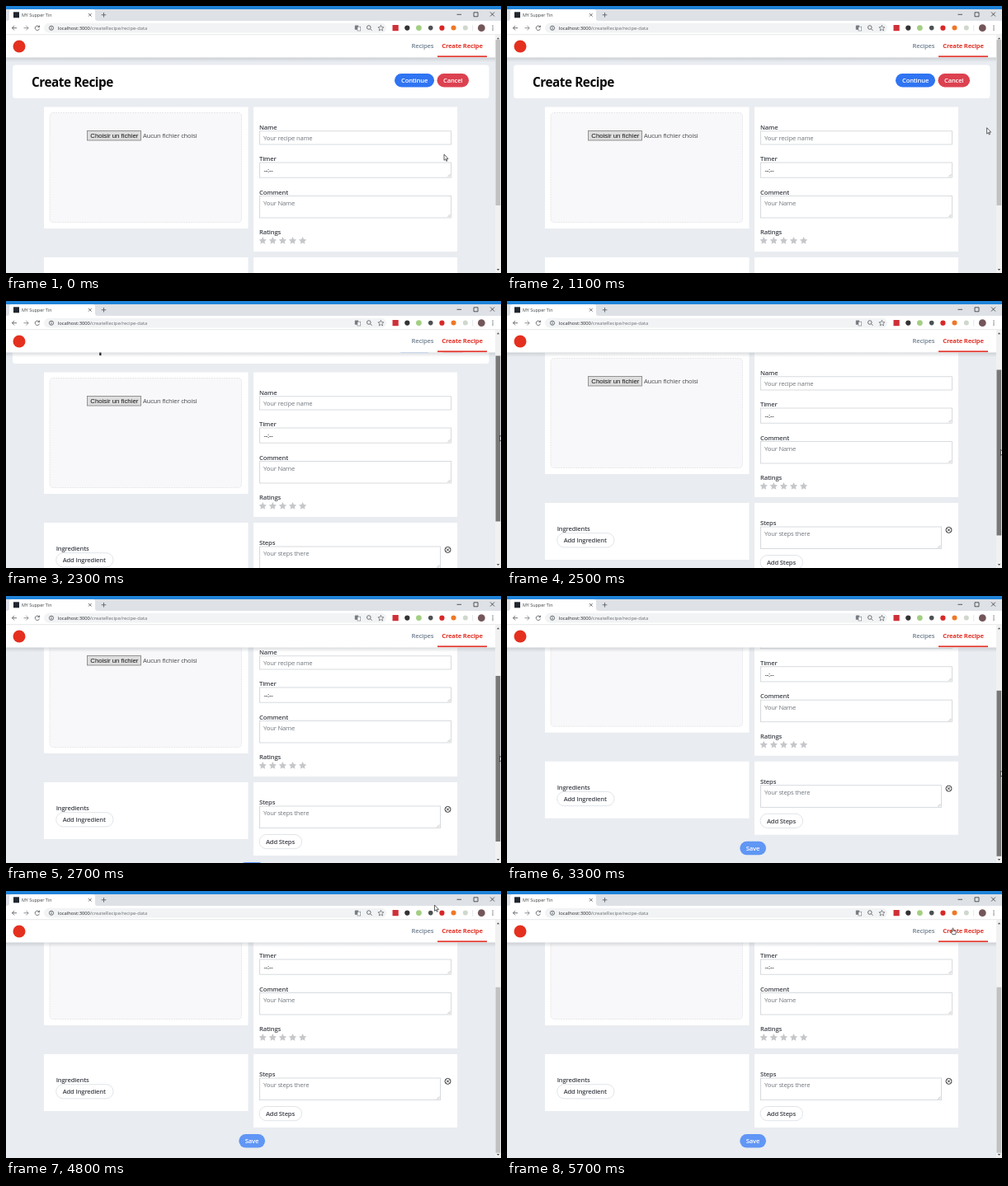
Write an HTML page that moves like this. It is 600x324 px and loops after 5800 ms.

```html
<!DOCTYPE html>
<html lang="en">
<head>
<meta charset="utf-8">
<title>Create Recipe</title>
<style>
html, body { margin: 0; width: 100%; height: 100%; overflow: hidden; background: #fff; }
svg { display: block; width: 100vw; height: 100vh; }
text { font: 7.6px "Open Sans", "Noto Sans", sans-serif; letter-spacing: -.16px; fill: #43474c; white-space: pre; }
.label { font-weight: 600; fill: #3d4148; }
.hint { fill: #70767d; }
.title { font-size: 15.3px; font-weight: 700; fill: #0b0b0d; letter-spacing: -.45px; }
.light { font-weight: 600; fill: #fff; }
.nav { font-weight: 600; fill: #6f7f8f; }
.active { font-weight: 700; fill: #e3342a; letter-spacing: -.2px; }
.native { font: 7.8px "Liberation Sans", Arial, sans-serif; letter-spacing: 0; fill: #111; }
.tab { font-size: 5.4px; letter-spacing: 0; fill: #3c4043; }
.url { font-size: 5.8px; letter-spacing: 0; fill: #6a6e73; }
.line { fill: none; stroke: #5f6368; stroke-width: .9; }
.field { fill: #fff; stroke: #cdd2d8; stroke-width: .8; }
.pill { fill: #fff; stroke: #d9dde2; stroke-width: .8; }
</style>
</head>
<body>
<svg id="stage" viewBox="0 0 600 324" preserveAspectRatio="none">
  <defs>
    <linearGradient id="shade" x2="0" y2="1">
      <stop offset="0" stop-color="#8c939b" stop-opacity=".34"/>
      <stop offset="1" stop-color="#8c939b" stop-opacity="0"/>
    </linearGradient>
  </defs>
  <rect width="600" height="324" fill="#e9ecf0"/>
  <g id="page"></g>
  <g id="nav"></g>
  <g id="chrome"></g>
  <g id="bar">
    <rect x="593" y="35" width="7" height="289" fill="#f1f1f1"/>
    <path d="M594.8 40.2l1.7-2 1.7 2zM594.8 319l1.7 2 1.7-2z" fill="#505050"/>
    <rect id="thumb" x="593.5" y="41" width="5.7" height="201"/>
  </g>
  <g id="pointer" stroke="#222" stroke-width=".7" stroke-linejoin="round" fill="#fff">
    <path id="arrow" d="M0 0V7.3L1.7 5.8 2.8 8.3 3.9 7.8 2.8 5.4H5z"/>
    <path id="hand" d="M-.7 .2Q0-.6 .7 .2V2.8L3 3.3Q3.9 3.6 3.8 4.5L3.2 7.4H-.6L-2.6 4.4Q-2.4 3.4-.7 4.6z"/>
  </g>
</svg>
<script>
const $ = id => document.getElementById(id);
const LOOP = 5800, STEP = 100;

const rect = (x, y, w, h, fill, r = 0) =>
  `<rect x="${x}" y="${y}" width="${w}" height="${h}" rx="${r}" fill="${fill}"/>`;
const shape = (cls, x, y, w, h, r = 0) =>
  `<rect class="${cls}" x="${x}" y="${y}" width="${w}" height="${h}" rx="${r}"/>`;
const text = (x, y, s, cls = '') => `<text x="${x}" y="${y}" class="${cls}">${s}</text>`;
const dot = (x, y, r, fill) => `<circle cx="${x}" cy="${y}" r="${r}" fill="${fill}"/>`;
const line = (d, extra = '') => `<path class="line" d="${d}" ${extra}/>`;
const area = (x, y, w, h) => shape('field', x, y, w, h) +
  line(`M${x + w - 4} ${y + h - 1}l3-3M${x + w - 2.2} ${y + h - 1}l1.2-1.2`, 'style="stroke:#9a9a9a;stroke-width:.6"');

function star(cx, cy, r) {
  const pts = Array.from({ length: 10 }, (_, i) => {
    const a = i * Math.PI / 5 - Math.PI / 2, d = i % 2 ? r * .48 : r;
    return (cx + d * Math.cos(a)).toFixed(2) + ',' + (cy + d * Math.sin(a)).toFixed(2);
  });
  return `<polygon points="${pts.join(' ')}" fill="#c5c7ca"/>`;
}

$('page').innerHTML = [
  rect(8, 71.5, 577.5, 40.5, '#fff', 3.5),
  text(31, 98, 'Create Recipe', 'title'),
  rect(471, 82, 48, 16.5, '#2f74f2', 8.2), text(479, 93, 'Continue', 'light'),
  rect(522.5, 82, 38.5, 16.5, '#dc4150', 8.2), text(530, 93, 'Cancel', 'light'),

  rect(46, 122.5, 247.5, 147.5, '#fff'),
  '<rect x="53" y="129.5" width="232.5" height="133" rx="4" fill="#f8f7f9" stroke="#e3e4e8" stroke-width=".8" stroke-dasharray="2 1"/>',
  '<rect x="98.5" y="151.5" width="65" height="11.5" fill="#dedede" stroke="#8b8b8b" stroke-width=".9"/>',
  text(102.3, 160, 'Choisir un fichier', 'native'),
  text(166, 160, 'Aucun fichier choisi'),

  rect(300, 122.5, 247, 175.5, '#fff'),
  text(307, 150, 'Name', 'label'), shape('field', 307.4, 151.8, 232, 16.2),
  text(312, 163, 'Your recipe name', 'hint'),
  text(307, 188, 'Timer', 'label'), area(307.4, 190, 232, 18.2),
  text(312.5, 202, '--:--', 'label'),
  text(307, 228.6, 'Comment', 'label'), area(307.4, 230.4, 232, 26.6),
  text(312, 242, 'Your Name', 'hint'),
  text(307, 277, 'Ratings', 'label'),
  ...[0, 1, 2, 3, 4].map(i => star(311.2 + i * 12.1, 284.9, 4.9)),

  rect(46, 305, 247.5, 69, '#fff'),
  text(60.7, 339, 'Ingredients', 'label'),
  shape('pill', 60.7, 341.7, 69.3, 17.2, 8.6), text(68.7, 353.4, 'Add Ingredient', 'label'),

  rect(300, 305, 247, 89, '#fff'),
  text(307, 332, 'Steps', 'label'), area(307.4, 334, 219, 26.6),
  text(312, 345.4, 'Your steps there', 'hint'),
  line('M533.9 336.3l3.2 3.2m0-3.2l-3.2 3.2', 'style="stroke:#222"'),
  '<circle class="line" cx="535.5" cy="337.9" r="3.5" style="stroke:#222"/>',
  shape('pill', 307, 368.5, 51.5, 17.2, 8.6), text(315, 380, 'Add Steps', 'label'),
  rect(282.3, 402, 31.7, 16.6, '#6096f5', 8.3), text(289.8, 413.2, 'Save', 'light')
].join('');

$('nav').innerHTML = [
  rect(0, 62, 593, 6, 'url(#shade)'),
  rect(0, 35, 593, 27.5, '#fff'),
  dot(16, 49, 7.5, '#e5301f'),
  text(491.5, 51, 'Recipes', 'nav'), text(528.3, 51, 'Create Recipe', 'active'),
  rect(523, 60.4, 60, 1.7, '#e3342a')
].join('');

$('chrome').innerHTML = [
  rect(0, 0, 600, 18, '#dee1e6'), rect(0, 0, 600, 4, '#1f83d8'),
  '<path d="M1 18Q4 18 4 15V7Q4 4 7 4H105Q108 4 108 7V15Q108 18 111 18z" fill="#fff"/>',
  rect(9, 7.3, 7, 7, '#20262f'),
  text(19, 13, 'MY Supper Tin', 'tab'),
  line('M100 9l3.6 3.6m0-3.6l-3.6 3.6M118.5 8v5.6m-2.8-2.8h5.6'),
  line('M546.5 10.3h5.5M567 7.8h5v5h-5zM587 7.5l5 5m0-5l-5 5', 'style="stroke:#333;stroke-width:.8"'),
  rect(0, 18, 600, 17, '#fff'), rect(0, 34.5, 600, .6, '#d6d8dc'),
  rect(46, 20.8, 415, 11.8, '#f1f3f4', 5.9),
  line('M13 26.7H7.4m2.7-2.7l-2.7 2.7 2.7 2.7'),
  line('M21.5 26.7h5.6m-2.7-2.7l2.7 2.7-2.7 2.7', 'opacity=".75"'),
  line('M40 25a2.7 2.7 0 1 0 .5 2.6M40.6 23.6v2.1h-2.1'),
  '<circle class="line" cx="55" cy="26.7" r="2.6"/>', line('M55 26.2v2M55 24.9v.7'),
  text(62.8, 28.9, '<tspan fill="#25282c">localhost:3000</tspan>/createRecipe/recipe-data', 'url'),
  rect(422.8, 23.5, 4.4, 5.2, '#777c82', .5),
  '<rect x="426" y="25.2" width="3.7" height="4.8" fill="#fff" stroke="#777c82" stroke-width=".6"/>',
  '<circle class="line" cx="439.8" cy="26" r="2.3"/>', line('M441.5 27.7l2 2'),
  '<path class="line" d="M454.4 23.3l1 2.3 2.5.2-1.9 1.6.6 2.5-2.2-1.3-2.2 1.3.6-2.5-1.9-1.6 2.5-.2z" style="stroke-width:.7"/>',
  rect(468.5, 23, 7.2, 7.2, '#cf3038'),
  dot(486.3, 26.6, 3.1, '#333'), dot(500.4, 26.6, 3.4, '#a3cf83'),
  dot(514.7, 26.6, 2.8, '#4c5152'), dot(528.4, 26.7, 3.1, '#d92727'),
  dot(542.5, 26.6, 3, '#ed7826'), dot(556.8, 26.6, 3, '#cfd8cc'),
  rect(565.5, 23, .6, 7.5, '#d5d7da'),
  dot(576.3, 26.7, 4.4, '#73565a'),
  ...[24.3, 26.7, 29.1].map(y => dot(590, y, .75, '#5f6368'))
].join('');

// Each track lists time, then one or more values.
const scrollTrack = [[2100, 0], [2300, 36], [2500, 60], [2700, 79], [3000, 96], [3400, 107]];
const moveTrack = [[800, 531, 180], [1200, 598.5, 137], [4300, 598.5, 214],
  [4500, 582, 140], [4800, 519.5, 17], [4900, 528, 30], [5100, 540.5, 45.3]];

function sample(track, t) {
  if (t <= track[0][0]) return track[0].slice(1);
  const i = track.findIndex(k => k[0] > t);
  if (i < 0) return track[track.length - 1].slice(1);
  const a = track[i - 1], b = track[i], p = (t - a[0]) / (b[0] - a[0]);
  return a.slice(1).map((v, j) => v + (b[j + 1] - v) * p);
}

function thumbColor(t) {
  if (t >= 2000 && t < 4000) return '#787878';
  return t >= 1200 && t < 4400 ? '#a8a8a8' : '#c1c1c1';
}

function render(ms) {
  const t = Math.floor(ms % LOOP / STEP) * STEP;
  const [scroll] = sample(scrollTrack, t);
  let [x, y] = sample(moveTrack, t);
  if (t >= 1200 && t <= 4300) y = 137 + scroll * .72;
  const link = t >= 5000;
  $('page').setAttribute('transform', `translate(0 ${-scroll})`);
  $('thumb').setAttribute('y', 41 + scroll * .708);
  $('thumb').setAttribute('fill', thumbColor(t));
  $('pointer').setAttribute('transform', `translate(${x} ${y})`);
  $('arrow').style.display = link ? 'none' : '';
  $('hand').style.display = link ? '' : 'none';
}

const start = performance.now();
function tick() {
  render(performance.now() - start);
  requestAnimationFrame(tick);
}
tick();
</script>
</body>
</html>
```
